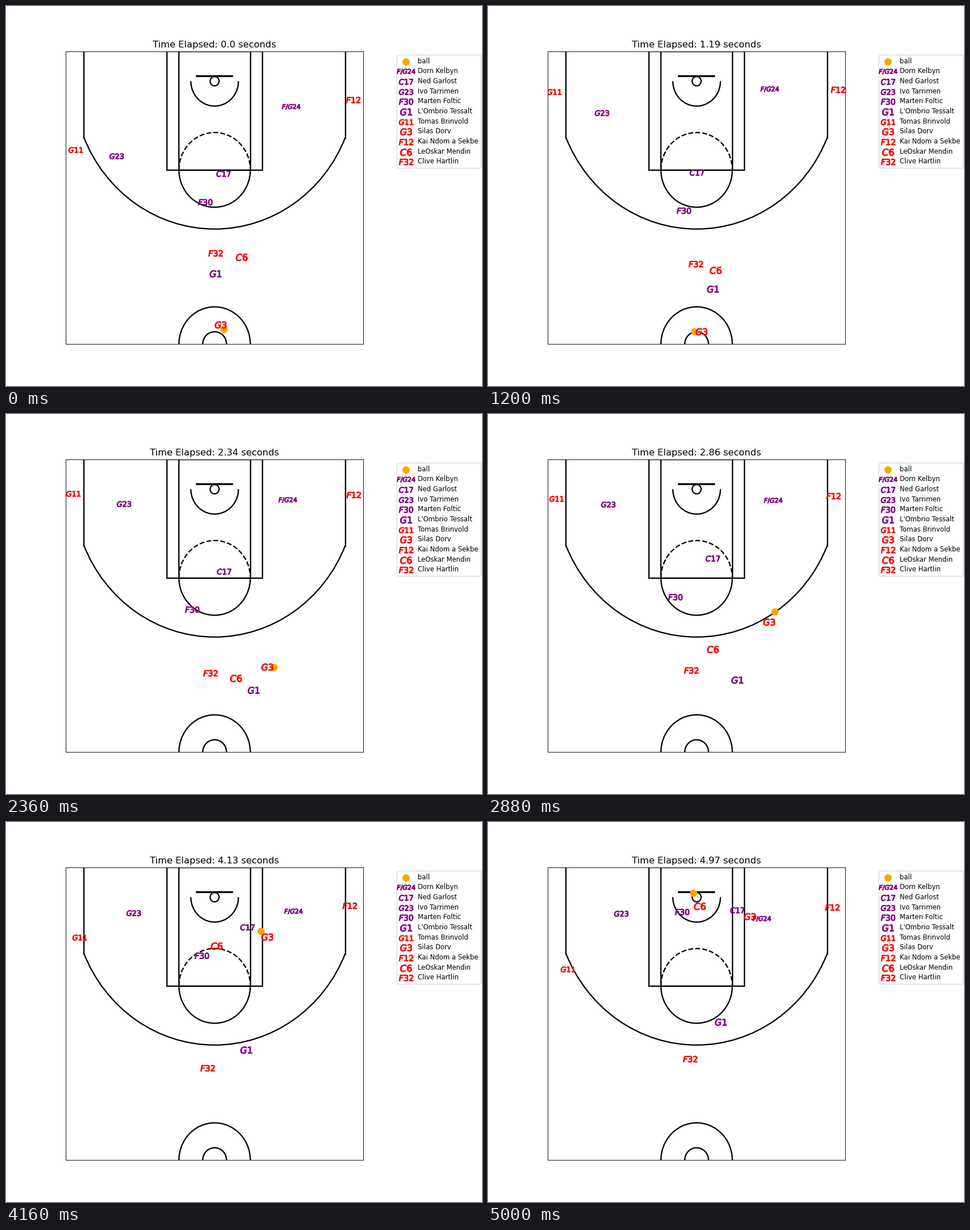
A matplotlib script that plays this animation: 837 by 669 pixels, repeating every 5040 ms.

```python
import matplotlib.pyplot as plt
import numpy as np
from matplotlib.animation import FuncAnimation
from matplotlib.patches import Arc, Circle, Rectangle

W, H, DPI = 837, 669, 83.7
FRAMES, INTERVAL = 126, 40
CLOCK_STEP = 0.0398  # game seconds per frame

# Waypoints are stage pixels from the top left, evenly spaced in time.
BALL = [(383, 569), (352, 581), (442, 504), (506, 329), (461, 207), (361, 125)]
PURPLE_TEAM = [
    ("F/G24", "Dorn Kelbyn",
     [(501, 177), (495, 145), (496, 152), (512, 153), (481, 170)]),
    ("C17", "Ned Garlost",
     [(382, 295), (367, 293), (386, 272), (416, 202), (438, 155)]),
    ("G23", "Ivo Tarrimen",
     [(194, 264), (203, 168), (215, 160), (234, 161)]),
    ("F30", "Marten Foltic",
     [(350, 345), (344, 360), (326, 339), (343, 268), (341, 158)]),
    ("G1", "L'Ombrio Tessalt",
     [(368, 471), (396, 498), (437, 482), (427, 423), (409, 352)]),
]
RED_TEAM = [
    ("G11", "Tomas Brinvold",
     [(122, 253), (116, 149), (118, 142), (125, 180), (140, 259)]),
    ("G3", "Silas Dorv",
     [(377, 561), (367, 583), (431, 494), (497, 349), (461, 215), (460, 166)]),
    ("F12", "Kai Ndom a Sekbe",
     [(610, 165), (615, 143), (605, 145), (605, 150)]),
    ("C6", "LeOskar Mendin",
     [(414, 442), (400, 459), (407, 484), (393, 399), (371, 236), (372, 148)]),
    ("F32", "Clive Hartlin",
     [(368, 435), (363, 458), (355, 446), (355, 417)]),
]


def glide(points):
    """Catmull-Rom curve through the waypoints, sampled at every frame."""
    p = np.array(points, float)
    p = np.vstack([2 * p[0] - p[1], p, 2 * p[-1] - p[-2]])
    u = np.linspace(0, len(points) - 1, FRAMES)
    k = np.minimum(u.astype(int), len(points) - 2)
    s = (u - k)[:, None]
    a, b, c, d = (p[k + i] for i in range(4))
    return b + s / 2 * (c - a + s * (2 * a - 5 * b + 4 * c - d
                                     + s * (3 * (b - c) + d - a)))


def draw_court(ax):
    line = dict(linewidth=2, color="black", fill=False)

    def arc(y, size, start, end, **style):
        ax.add_patch(Arc((0, y), size, size, theta1=start, theta2=end,
                         **line, **style))

    def box(x, y, w, h):
        ax.add_patch(Rectangle((x, y), w, h, **line))

    ax.add_patch(Circle((0, 0), 7.5, **line))
    box(-30, -7.5, 60, -1)
    for half_width in (80, 60):
        box(-half_width, -47.5, 2 * half_width, 190)
    for x in (-220, 220):
        box(x, -47.5, 0, 140)
    arc(0, 80, 0, 180)
    arc(0, 475, 22, 158)
    arc(142.5, 120, 0, 180)
    arc(142.5, 120, 180, 360, linestyle="dashed")
    for size in (120, 40):
        arc(422.5, size, 180, 360)


# The small margin guards the whole-pixel size against rounding down.
fig = plt.figure(figsize=((W + 0.01) / DPI, (H + 0.01) / DPI), dpi=DPI,
                 facecolor="white")
fig.subplots_adjust(left=0.1258, right=0.7508, bottom=0.11, top=0.88)
ax = fig.add_subplot()
ax.set(xlim=(-250, 250), ylim=(422.5, -47.5), xticks=[], yticks=[])
draw_court(ax)
title = ax.set_title("", fontsize=14)

to_court = ax.transData.inverted()
movers = []


def add_mover(marker, size, color, name, points):
    path = to_court.transform(glide(points) * (1, -1) + (0, H))
    dot = ax.scatter(*path[0], s=size, marker=marker, color=color,
                     linewidths=1, label=name)
    movers.append((dot, path))


add_mover("o", 100, "orange", "ball", BALL)
for color, team in (("purple", PURPLE_TEAM), ("red", RED_TEAM)):
    for label, name, points in team:
        add_mover(f"${label}$", 150 * len(label), color, name, points)

ax.legend(loc="upper left", bbox_to_anchor=(1.1, 1), fontsize=10,
          labelspacing=0.4)


def update(frame):
    for dot, path in movers:
        dot.set_offsets(path[frame])
    seconds = int(frame * CLOCK_STEP * 100) / 100
    title.set_text(f"Time Elapsed: {seconds} seconds")
    return [title] + [dot for dot, _ in movers]


anim = FuncAnimation(fig, update, frames=FRAMES, interval=INTERVAL, repeat=True)
plt.show()
```
